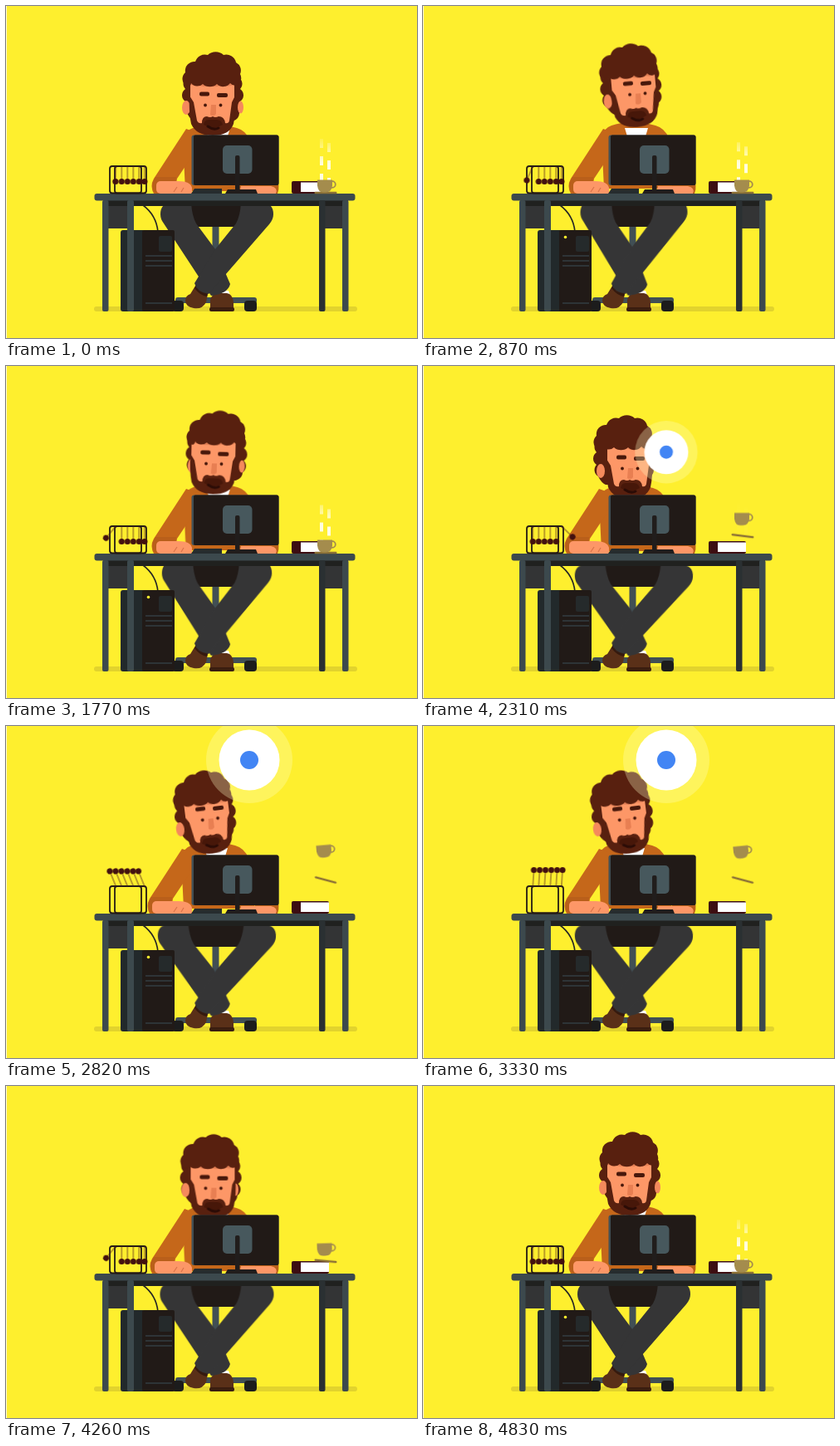
An HTML page without scripts that plays this animation: 495x400 px, repeating every 4860 ms.

```html
<!DOCTYPE html>
<html lang="en">
<head>
<meta charset="utf-8">
<title>Desk daydream</title>
<style>
  html, body { margin: 0; width: 100%; height: 100%; overflow: hidden; background: #feef2e; }
  svg { display: block; width: 495px; height: 400px; }

  :root {
    --loop: 4860ms;
    --rise: cubic-bezier(.1, .6, .4, 1);
    --fall: cubic-bezier(.6, 0, .9, .4);
  }
  .head, .turn, .look, .ear-l, .ear-r, .body, .arm, .leg, .bubble, .cup, .saucer, .steam,
  .swing-l, .swing-r, .bob, .string, .sway {
    animation: var(--loop) ease-in-out infinite;
  }

  /* Person */
  .head { transform-origin: 249px 150px; animation-name: head; }
  .turn { animation-name: turn; }
  .look { animation-name: look; }
  .ear-l { animation-name: ear-l; }
  .ear-r { animation-name: ear-r; }
  .body { animation-name: body; }
  .arm { animation-name: arm; }
  .leg { animation-name: leg; }
  .leg-l { --dir: 1; transform-origin: 257px 342px; }
  .leg-r { --dir: -1; transform-origin: 238px 340px; }

  @keyframes head {
    0%, 11%, 93%, 100% { transform: none; }
    17.5%, 21.5% { transform: translate(5px, -10px) rotate(-5deg); }
    26%, 32.5% { transform: translate(11px, -7px) rotate(4deg); }
    39%, 44.5% { transform: translate(0, 1px); }
    47.5% { transform: translate(-7px, 4px); }
    52%, 72.5% { transform: translate(-4px, -2px) rotate(-7deg); }
    76.5%, 81% { transform: translate(-6px, 7px); }
  }
  @keyframes turn {
    0%, 11%, 39%, 44.5%, 93%, 100% { transform: none; }
    17.5%, 21.5% { transform: translateX(4px); }
    26%, 32.5% { transform: translateX(-10px); }
    47.5%, 76.5%, 81% { transform: translateX(7px); }
    52%, 72.5% { transform: translateX(3px); }
  }
  @keyframes look {
    0%, 11%, 26%, 47.5%, 93%, 100% { transform: none; }
    17.5%, 21.5% { transform: translate(3px, -3px); }
    52%, 72.5% { transform: translate(2px, -5px); }
    76.5%, 81% { transform: translateY(2px); }
  }
  @keyframes ear-l {
    0%, 11%, 39%, 44.5%, 52%, 72.5%, 93%, 100% { transform: none; }
    17.5%, 21.5% { transform: translateX(3px); }
    26%, 32.5% { transform: translateX(8px); }
    47.5%, 81% { transform: translateX(4px); }
  }
  @keyframes ear-r {
    0%, 11%, 39%, 44.5%, 93%, 100% { transform: none; }
    17.5%, 21.5%, 47.5%, 81% { transform: translateX(-9px); }
    26%, 32.5% { transform: translateX(-8px); }
  }
  @keyframes body {
    0%, 11%, 39%, 44.5%, 93%, 100% { transform: none; }
    17.5%, 32.5% { transform: translate(2px, -3px); }
    47.5%, 76.5%, 81% { transform: translate(-1px, 0); }
    52%, 72.5% { transform: translate(-2px, -3px); }
  }
  @keyframes arm {
    0%, 44.5%, 93%, 100% { transform: none; }
    47.5%, 81% { transform: translateX(-5px); }
  }
  @keyframes leg {
    0%, 11%, 40%, 43%, 91%, 100% { transform: none; }
    17.5%, 33% { transform: rotate(calc(var(--dir) * 2.2deg)); }
    47.5%, 79% { transform: rotate(calc(var(--dir) * -2deg)); }
  }

  /* Floating things */
  .bubble { animation-name: bubble; animation-timing-function: linear; }
  .cup { transform-origin: 384px 217px; animation-name: cup; }
  .saucer { transform-origin: 385px 225px; animation-name: saucer; }
  .steam { animation-name: steam; }
  .steam path { stroke-dasharray: 11 10; animation: drift 972ms linear infinite; }
  .led { animation: blink 972ms step-end infinite; }

  @keyframes bubble {
    0%, 45% { transform: translate(293px, 150px) scale(0); }
    47.5% { transform: translate(293px, 105px) scale(.72); animation-timing-function: ease-out; }
    52% { transform: translate(293px, 39px) scale(1); }
    58%, 72.5% { transform: translate(293px, 41px) scale(1); animation-timing-function: ease-in; }
    76.5% { transform: translate(293px, 107px) scale(.71); }
    78.6%, 100% { transform: translate(293px, 150px) scale(0); }
  }
  @keyframes cup {
    0%, 44.8% { transform: none; animation-timing-function: linear; }
    47.5% { transform: translateY(-32px); animation-timing-function: ease-out; }
    53% { transform: translate(-1px, -63px) rotate(-3deg); }
    58% { transform: translate(-1px, -66px) rotate(-5deg); }
    78.5% { transform: translate(-1px, -64px) rotate(-6deg); animation-timing-function: ease-in; }
    90%, 100% { transform: none; }
  }
  @keyframes saucer {
    0%, 44.8% { transform: none; animation-timing-function: linear; }
    47.5% { transform: translateY(-20px) rotate(7deg); animation-timing-function: ease-out; }
    53% { transform: translateY(-38px) rotate(13deg); }
    58%, 78.5% { transform: translateY(-39.5px) rotate(15deg); animation-timing-function: ease-in; }
    90.5%, 100% { transform: none; }
  }
  @keyframes steam {
    0%, 44.8%, 95%, 100% { opacity: 1; }
    48%, 90% { opacity: 0; }
  }
  @keyframes drift { to { stroke-dashoffset: 42; } }
  @keyframes blink { 0% { opacity: 0; } 50% { opacity: 1; } }

  /* Ball cradle */
  .swing-l { animation-name: swing-l; animation-timing-function: var(--rise); }
  .swing-r { --late: 90ms; animation-name: swing-r; animation-timing-function: var(--rise); }
  .bob { fill: #43110f; animation-name: bob; animation-delay: var(--late, 0s); }
  .string { stroke: #55221c; stroke-width: .8; animation-name: string; animation-delay: var(--late, 0s); }
  .sway { animation-name: sway; }

  @keyframes swing-l {
    0%, 8.64%, 17.28%, 25.93%, 34.57%, 43.21%, 82.72%, 91.36%, 100% { transform: none; }
    4.32%, 21.6%, 38.89%, 87.04% { transform: rotate(48deg); animation-timing-function: var(--fall); }
  }
  @keyframes swing-r {
    0%, 8.64%, 17.28%, 25.93%, 34.57%, 43.21%, 51.5%, 73.5%, 82.72%, 91.36%, 100% { transform: none; }
    12.96%, 30.25%, 47.53%, 78.8%, 95.68% { transform: rotate(-46deg); animation-timing-function: var(--fall); }
    76.5% { transform: rotate(36deg); animation-timing-function: linear; }
  }
  @keyframes bob {
    0%, 48%, 78.4%, 100% { transform: none; }
    54%, 74.6% { transform: translateY(-38px); }
  }
  @keyframes string {
    0%, 48%, 78.4%, 100% { transform: none; }
    54%, 74.6% { transform: scaleY(-1); }
  }
  @keyframes sway {
    0%, 51%, 67%, 76%, 100% { transform: none; }
    58% { transform: rotate(-22deg); }
    71% { transform: rotate(12deg); }
  }
</style>
</head>
<body>
<svg viewBox="0 0 495 400">
  <defs>
    <linearGradient id="fade" x1="0" y1="0" x2="0" y2="1">
      <stop offset="0" stop-color="#fff" stop-opacity=".1"/>
      <stop offset=".6" stop-color="#fff"/>
    </linearGradient>
    <mask id="steam-mask" maskUnits="userSpaceOnUse" x="374" y="158" width="22" height="53">
      <rect x="374" y="158" width="22" height="53" fill="url(#fade)"/>
    </mask>
  </defs>

  <rect width="495" height="400" fill="#feef2e"/>
  <rect width="1" height="400" fill="#fffbd0"/>
  <rect x="106" y="362" width="317" height="6" rx="3" fill="#e2d32d"/>

  <!-- Chair -->
  <g fill="#414f54">
    <rect x="248.500" y="262" width="8" height="92"/>
    <rect x="204" y="351" width="98" height="7" rx="3"/>
  </g>
  <rect x="218" y="236" width="70" height="30" rx="5" fill="#211a17"/>
  <g fill="#1c1c1c">
    <rect x="200" y="355" width="14" height="13" rx="4"/>
    <rect x="287" y="355" width="15" height="13" rx="4"/>
  </g>

  <!-- Shoes and legs -->
  <path d="M257 342l11 1 3 8h-14z" fill="#fff"/>
  <path d="M246 364V354q2-8 12-8h8q7 1 8 11v7z" fill="#5a3018"/>
  <rect x="245" y="363" width="30" height="5" rx="2" fill="#3a1d10"/>
  <path d="M230 334l14 8-3 15q-5 9-15 7-10-2-10-9 0-6 6-8z" fill="#5a3018"/>
  <path d="M230 334l14 8-2 8q-8-1-15-10z" fill="#351a0f"/>
  <g fill="#353536">
    <path class="leg leg-l" d="M186 251q0-14 14-14h23q1 16 6 25l23 31 18 42q-3 12-23 14L190 262q-4-5-4-11z"/>
    <path class="leg leg-r" d="M322 251q0-14-14-14h-25q-1 16-6 25l-25 31-25 41q3 11 17 13L317 263q5-6 5-12z"/>
  </g>

  <!-- Tower -->
  <path d="M165 240q16 12 18 32" fill="none" stroke="#252525" stroke-width="1.6"/>
  <rect x="138" y="270" width="30" height="98" rx="3" fill="#22292b"/>
  <rect x="164" y="270" width="39" height="98" rx="2" fill="#211a17"/>
  <rect x="184" y="277" width="16" height="19" rx="2" fill="#252a2b"/>
  <path d="M168 301h32m-32 6h32m-32 6h32m-32 45h32" stroke="#333e41" stroke-width="1.6"/>
  <circle class="led" cx="171.500" cy="278.500" r="1.8" fill="#ffef2e"/>

  <!-- Torso -->
  <g class="body">
    <path d="M225 147q24-8 53 0 11 3 16 15l8 61H216l-3-62q3-11 12-14z" fill="#c5671a"/>
    <path d="M241 150h28l-3 10h-22z" fill="#fff"/>
  </g>
  <g class="arm">
    <path d="M217 148L178 208q-5 9 0 18h25l3-18 20-30 2-26z" fill="#c5671a"/>
    <path d="M180 206h25l-2 20h-22q-9-8-1-20z" fill="#b95f1a"/>
    <rect x="181" y="211" width="28" height="15" rx="5" fill="#fd9767"/>
  </g>
  <path d="M300 206h24q7 9 3 20h-27z" fill="#b95f1a"/>
  <path d="M190 211h18q14 0 16 8v7h-34z" fill="#fd9767"/>
  <path d="M283 217h36q9 2 6 9h-44z" fill="#fd9767"/>
  <path d="M202 224l4-6m5 6l3-5" stroke="#d9744a" stroke-width="1.2"/>

  <!-- Head -->
  <g class="head">
    <path d="M218 86a9 9 0 0 0-2 14a9 9 0 0 0 0 15a9 9 0 0 0 2 14q4 8 9 10h46q8-3 8-10a9 9 0 0 0 1-14a9 9 0 0 0 0-15a9 9 0 0 0-2-14z" fill="#58200f"/>
    <ellipse class="ear-l" cx="217" cy="122.500" rx="5" ry="8.500" fill="#f58a5c"/>
    <ellipse class="ear-r" cx="282.500" cy="122" rx="3.500" ry="7.500" fill="#f58a5c"/>
    <g class="turn">
      <path d="M222 88h53v46q-3 18-26 18t-27-18z" fill="#fd9767"/>
      <path d="M222 86h53v8q-7 5-13 0-8 6-16 1-9 5-16-1-5 3-8 0z" fill="#e58156"/>
      <path d="M221 108l5 8 4 22q2 4 6 3 0-8 6-8 4 2 7 0 3 2 7 0 7 0 8 8 4 1 5-3l3-22 4-8q1 20-2 34-5 14-25 14t-26-14q-3-14-2-34z" fill="#58200f"/>
      <path d="M238 143q1-7 8-6h6q7-1 9 6-11 7-23 0z" fill="#471709"/>
      <path d="M243 145q7 5 13 2" fill="none" stroke="#2b0c06" stroke-width="3" stroke-linecap="round"/>
      <g class="look">
        <path d="M247 119h6v11q-3 4-7 1z" fill="#e87f52"/>
        <rect x="233" y="103.500" width="12" height="5" rx="2" fill="#48180b"/>
        <rect x="254" y="105" width="13" height="5" rx="2" fill="#48180b"/>
        <g fill="#48180b"><circle cx="240" cy="119.500" r="1.900"/><circle cx="258.500" cy="119.500" r="1.900"/></g>
      </g>
    </g>
    <path d="M217 96a10 10 0 0 1-1-16a11 11 0 0 1 12-13a12 12 0 0 1 15-8a14 14 0 0 1 19 0a12 12 0 0 1 15 9a11 11 0 0 1 5 14a10 10 0 0 1-3 13a8 8 0 0 1-9-2a10 9 0 0 1-16 1a11 9 0 0 1-17 0a9 8 0 0 1-14-1q-1 6-6 3z" fill="#58200f"/>
  </g>

  <!-- Thought bubble -->
  <g class="bubble">
    <circle r="52" fill="#ffffc8" opacity=".3"/>
    <circle r="36.500" fill="#fff"/>
    <circle r="11" fill="#4285f4"/>
  </g>

  <!-- Desk -->
  <g fill="#333435">
    <rect x="117" y="232" width="32" height="36"/>
    <rect x="382" y="232" width="25" height="36"/>
  </g>
  <rect x="117" y="233" width="295" height="8" fill="#20211f"/>
  <g fill="#3c494d">
    <rect x="116" y="234" width="7.500" height="134" rx="2"/>
    <rect x="146" y="234" width="8" height="134" rx="2"/>
    <rect x="405" y="234" width="7.500" height="134" rx="2"/>
    <rect x="106.500" y="226" width="314" height="8.500" rx="3"/>
  </g>
  <rect x="377" y="234" width="7.500" height="134" rx="2" fill="#2a3032"/>

  <!-- Monitor and keyboard -->
  <rect x="223.500" y="155.500" width="105" height="60.500" rx="3" fill="#414f54"/>
  <rect x="226" y="155.500" width="102.500" height="60.500" rx="2" fill="#211a17"/>
  <rect x="261" y="168" width="35.500" height="34" rx="5" fill="#47585d"/>
  <path d="M223 226l4-6h33v6z" fill="#262c2e"/>
  <rect x="276" y="180" width="5.500" height="43" rx="2" fill="#211d1c"/>
  <path d="M264 226l3-5h34l2 5z" fill="#211d1c"/>

  <!-- Book -->
  <rect x="344" y="211" width="45" height="15" rx="2" fill="#3d0e12"/>
  <rect x="355" y="212.500" width="34" height="11.500" fill="#fff"/>

  <!-- Coffee -->
  <g class="steam" mask="url(#steam-mask)" stroke="#fffde0" stroke-width="4">
    <path d="M380 160V210"/>
    <path d="M389 165V210"/>
  </g>
  <rect class="saucer" x="371.500" y="223.700" width="27" height="2.500" rx="1.200" fill="#8c7136"/>
  <g class="cup">
    <circle cx="393" cy="215" r="3.800" fill="none" stroke="#a48c4d" stroke-width="1.800"/>
    <path d="M375 209.500h18v7q-1 8-8 8h-3q-6 0-7-8z" fill="#a48c4d"/>
  </g>

  <!-- Ball cradle -->
  <g fill="none" stroke="#241a16" stroke-width="1.800">
    <rect x="125" y="193" width="38" height="32.500" rx="3"/>
    <rect x="131" y="193" width="38" height="32.500" rx="3"/>
  </g>
  <g transform="translate(132.300 193)">
    <g class="swing-l"><g class="sway"><path class="string" d="M0 0V18"/><circle class="bob" cy="18.500" r="3.600"/></g></g>
  </g>
  <g transform="translate(139.300 193)">
    <g class="sway"><path class="string" d="M0 0V18"/><circle class="bob" cy="18.500" r="3.600"/></g>
  </g>
  <g transform="translate(146.300 193)">
    <g class="sway"><path class="string" d="M0 0V18"/><circle class="bob" cy="18.500" r="3.600"/></g>
  </g>
  <g transform="translate(153.300 193)">
    <g class="sway"><path class="string" d="M0 0V18"/><circle class="bob" cy="18.500" r="3.600"/></g>
  </g>
  <g transform="translate(160.300 193)">
    <g class="sway"><path class="string" d="M0 0V18"/><circle class="bob" cy="18.500" r="3.600"/></g>
  </g>
  <g transform="translate(166.800 193)">
    <g class="swing-r"><g class="sway"><path class="string" d="M0 0V18"/><circle class="bob" cy="18.500" r="3.600"/></g></g>
  </g>
</svg>
</body>
</html>
```
